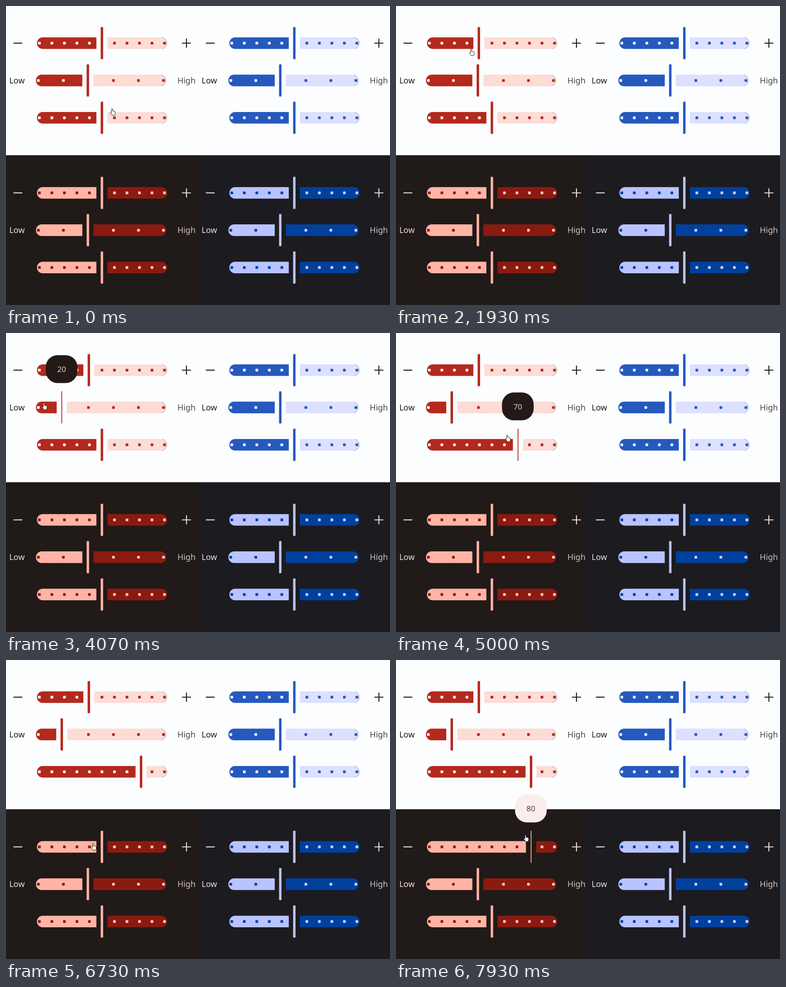
These frames come from a looping animation (849x660 px, 8000 ms). An HTML page:

```html
<!DOCTYPE html>
<html lang="en">
<head>
<meta charset="utf-8">
<title>Sliders</title>
<style>
  html, body { margin: 0; width: 100%; height: 100%; overflow: hidden; }
  svg { display: block; width: 100%; height: 100%; }
  text { font-family: "Noto Sans", "Open Sans", sans-serif; font-size: 18px; }
  .tip text { font-size: 17px; text-anchor: middle; }
</style>
</head>
<body>
<svg id="stage" viewBox="0 0 849 660"></svg>
<script>
const LOOP = 8000, UNIT = 2.885, COLUMN = 425.4, LOWER = 330.5;
const TRACK = { length: 288.5, radius: 12.8, inset: .6 };
const stage = document.getElementById('stage');

const light = { y: 0, bg: '#fcfdff', ink: '#211a1b', soft: '#4a4547', tip: '#231a18', tipInk: '#d9d0ce', edge: true };
const dark = { y: 1, ink: '#ece0dd', soft: '#cdc4c2', tip: '#f9eeeb', tipInk: '#4a3f3d' };
const themes = [
  { ...light, x: 0, active: '#b3291e', rest: '#fddcd6', dotOn: '#fff1ee', dotOff: '#b3291e' },
  { ...light, x: 1, active: '#2559bd', rest: '#dde0ff', dotOn: '#f0f1ff', dotOff: '#2559bd' },
  { ...dark, x: 0, bg: '#201a18', active: '#ffb4a5', rest: '#8b1a10', dotOn: '#8b1a10', dotOff: '#ffc5b9' },
  { ...dark, x: 1, bg: '#1c1b20', active: '#b9c3ff', rest: '#00419e', dotOn: '#00419e', dotOff: '#c6ceff' }
];

const rows = [
  { left: 67.8, step: 10, value: 50 },
  { left: 65.6, step: 20, value: 40 },
  { left: 67.8, step: 10, value: 50 }
];
rows.forEach((row, i) => row.y = 82 + 82.4 * i);

// reach: pointer travel to the thumb; grab: its distance left of the thumb;
// lift: vertical drift while held; pulls: start, end, value dragged to
const drags = [
  { theme: 0, row: 0, reach: [30, 270], start: 530, end: 1870, grab: 16, lift: [-4, -7],
    pulls: [[530, 1130, 91], [1330, 1730, 40]] },
  { theme: 0, row: 1, reach: [1800, 2270], start: 2270, end: 4200, grab: 12, lift: [10, -3],
    pulls: [[2270, 2670, 84], [2870, 3000, 115], [3200, 4070, 11]] },
  { theme: 0, row: 2, reach: [4200, 4670], start: 4730, end: 6330, grab: 18, lift: [-14, -14],
    pulls: [[4870, 5000, 68.5], [5270, 5670, 10], [5670, 6130, 79]] },
  { theme: 2, row: 0, reach: [6300, 6600], start: 6800, end: LOOP, grab: 18, lift: [0, -20],
    pulls: [[6870, 7330, 10], [7470, 7930, 82.5]] }
];

const clamp = (v, low, high) => Math.max(low, Math.min(high, v));
const mix = (a, b, k) => a + (b - a) * k;
const progress = (t, from, to) => clamp((t - from) / (to - from), 0, 1);

function pulledTo(drag, t) {
  return drag.pulls.reduce((v, [from, to, target]) => mix(v, target, progress(t, from, to)), rows[drag.row].value);
}

function snappedValue(drag, t) {
  const { step } = rows[drag.row];
  return clamp(Math.round(pulledTo(drag, t) / step) * step, 0, 100);
}

function pointerAt(t) {
  let x = 236, y = 234;
  for (const drag of drags) {
    const row = rows[drag.row], k = progress(t, ...drag.reach);
    const lift = mix(...drag.lift, progress(t, drag.start, drag.end));
    x = mix(x, row.left + pulledTo(drag, t) * UNIT - drag.grab, k);
    y = mix(y, row.y + themes[drag.theme].y * LOWER + lift, k);
  }
  return [x, y];
}

function add(parent, tag, attrs = {}) {
  const el = document.createElementNS('http://www.w3.org/2000/svg', tag);
  for (const key in attrs) el.setAttribute(key, attrs[key]);
  parent.appendChild(el);
  return el;
}

const rect = (x, y, w, h, r, fill) =>
  `<rect x="${x}" y="${y}" width="${w}" height="${h}" rx="${r}" fill="${fill}"/>`;
const line = (d, color, width) =>
  `<path d="${d}" fill="none" stroke="${color}" stroke-width="${width}"/>`;

// Half a track: flat at x, round at the cap centre
function trackHalf(x, cap, top, sweep, fill) {
  const r = TRACK.radius;
  return `<path d="M${x} ${top}H${cap}a${r} ${r} 0 0 ${sweep} 0 ${2 * r}H${x}z" fill="${fill}"/>`;
}

function sliderMarkup(theme, row, value, pressed) {
  const { radius, inset, length } = TRACK;
  const x = row.left + value * UNIT, top = row.y - radius;
  const gap = pressed ? 11.3 : 12.2, thumb = pressed ? 1.8 : 5.4;
  const capA = row.left + inset + radius, capB = row.left + length - radius;
  let out = '';
  if (x - gap > capA) out += trackHalf(x - gap, capA, top, 0, theme.active);
  if (x + gap < capB) {
    out += trackHalf(x + gap, capB, top, 1, theme.rest);
    if (theme.edge)
      out += line(`M${capB + 2} ${top + .3}A${radius} ${radius} 0 0 1 ${capB + 2} ${row.y + radius - .3}`, '#8f8b8c', .8);
  }
  const count = 100 / row.step;
  for (let i = 0; i <= count; i++) {
    const dot = row.left + 6 + 276.6 * i / count;
    if (Math.abs(dot - x) > gap)
      out += rect(dot - 3, row.y - 3, 6, 6, 1.3, dot < x ? theme.dotOn : theme.dotOff);
  }
  return out + rect(x - thumb / 2, row.y - 35.6, thumb, 71, thumb / 4, theme.active);
}

function buildPanel(theme) {
  add(stage, 'rect', { x: theme.x * 424.5, y: theme.y * 329.4, width: 425, height: 331, fill: theme.bg });
  const panel = add(stage, 'g', { transform: `translate(${theme.x * COLUMN} ${theme.y * LOWER})` });
  add(panel, 'g').innerHTML =
    line('M16.5 82H36', theme.ink, 2.2) +
    line('M389 82H409M399 72V92', theme.ink, 2.2) +
    `<text x="7.2" y="170.8" fill="${theme.ink}">Low</text>` +
    `<text x="378.9" y="170.8" fill="${theme.soft}">High</text>`;
  theme.sliders = rows.map(row => {
    const group = add(panel, 'g');
    group.innerHTML = sliderMarkup(theme, row, row.value, false);
    return group;
  });
}

themes.forEach(buildPanel);

for (const drag of drags) {
  const theme = themes[drag.theme];
  drag.tip = add(stage, 'g', { class: 'tip' });
  add(drag.tip, 'rect', { x: -35, y: -61.5, width: 70, height: 61.5, rx: 26, fill: theme.tip });
  drag.label = add(drag.tip, 'text', { y: -24.2, fill: theme.tipInk });
}

const hand = add(stage, 'path', {
  d: 'M-2.7 1V-6Q-2.7 -7.4 -1.4 -7.4T-.1 -6V-2.2Q1 -3 2 -1.8Q3.2 -2.4 3.9 -1.2Q5.4 -1.4 5.4 .4V3Q5.4 4.5 4 7.2H-1.6Q-2.5 5 -4.8 2Q-5.6 .5 -4.4 0Q-3.5 0 -2.7 1z',
  fill: '#fff', stroke: '#1b1716', 'stroke-linejoin': 'round'
});

function render(t) {
  for (const drag of drags) {
    const theme = themes[drag.theme], row = rows[drag.row];
    const value = snappedValue(drag, t);
    const pressed = t >= drag.start && t < drag.end;
    const state = `${value} ${pressed}`;
    if (drag.state !== state) {
      drag.state = state;
      drag.label.textContent = value;
      theme.sliders[drag.row].innerHTML = sliderMarkup(theme, row, value, pressed);
    }
    const scale = progress(t, drag.start - 70, drag.start + 60) - progress(t, drag.end - 70, drag.end + 60);
    const shown = pressed ? progress(t, drag.start - 70, drag.start + 60) : t < drag.start ? 0 : scale;
    // The tip stays inside the stage
    const bottom = Math.max(60.5, row.y + theme.y * LOWER - 54);
    drag.tip.style.display = shown ? '' : 'none';
    drag.tip.setAttribute('transform', `translate(${row.left + value * UNIT - .4} ${bottom}) scale(${shown})`);
  }
  hand.setAttribute('transform', `translate(${pointerAt(t).join(' ')})`);
}

// Time advances in fifteenths of a second, rounded to 10 ms.
function tick(now) {
  const t = Math.max(0, now - begin) % LOOP;
  render(Math.round(Math.floor((t + 4) * .015) / .15) * 10 % LOOP);
  requestAnimationFrame(tick);
}
const begin = performance.now();
render(0);
requestAnimationFrame(tick);
</script>
</body>
</html>
```
